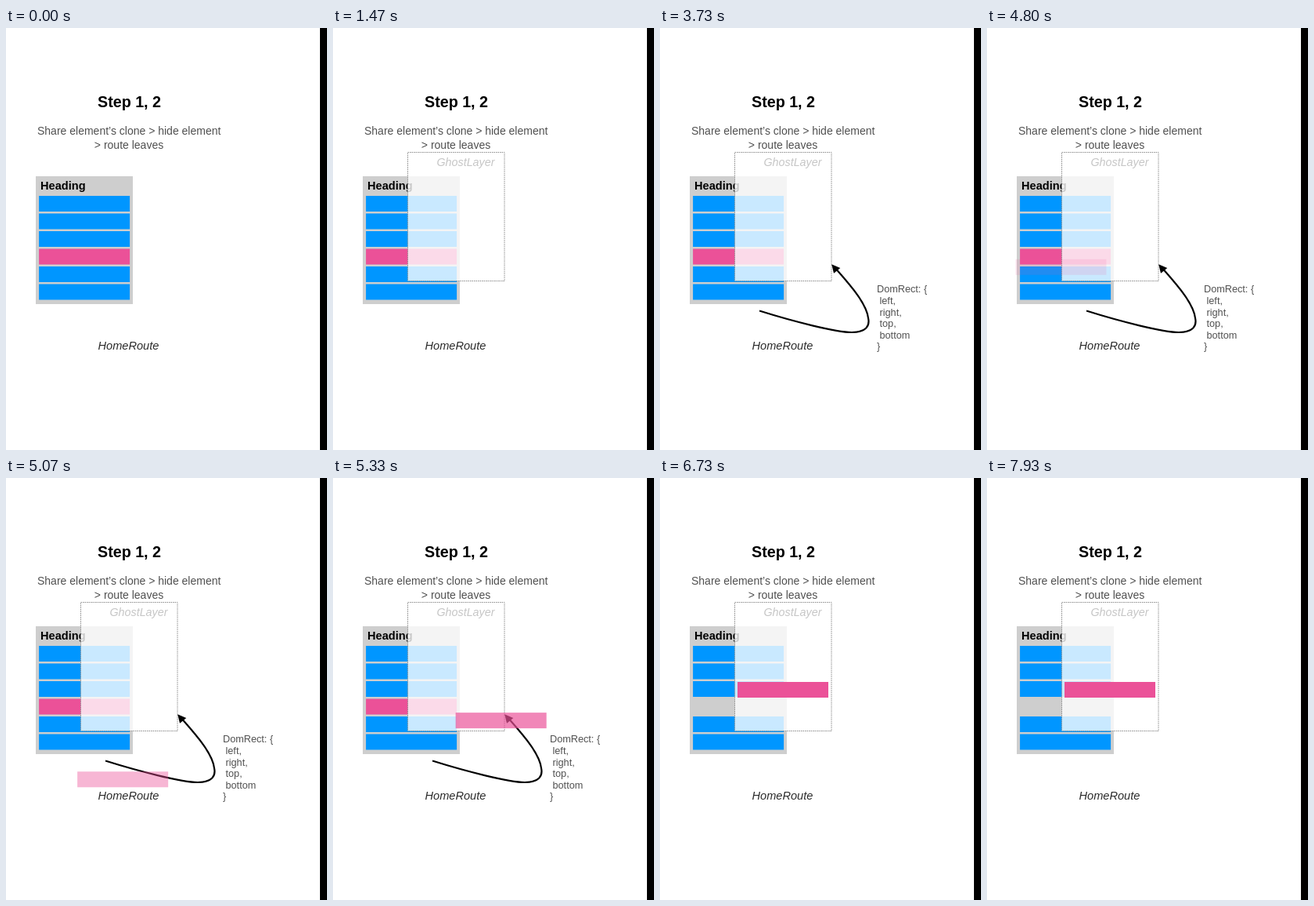
An HTML page for the animation above (8000 ms loop, 410 by 538 pixels).

```html
<!DOCTYPE html>
<html lang="en">
<head>
<meta charset="utf-8">
<title>Shared element transition</title>
<style>
  html, body { margin: 0; width: 100%; height: 100%; overflow: hidden; background: #fff; }
  svg { display: block; width: 410px; height: 538px; }
  text { font-family: "Liberation Sans", Arial, sans-serif; white-space: pre; }
  .bold { font-weight: bold; fill: #000; }
  .light { fill: #505050; }
  .italic { font-style: italic; }
  .center { text-anchor: middle; }
</style>
</head>
<body>
<svg viewBox="0 0 410 538">
  <rect width="410" height="538" fill="#fff"/>
  <rect x="401" width="9" height="538" fill="#000"/>

  <text class="bold center" x="157.5" y="101.3" font-size="19.7">Step 1, 2</text>
  <g class="light center" font-size="14">
    <text x="157.2" y="135.6">Share element’s clone &gt; hide element</text>
    <text x="157" y="153.5">&gt; route leaves</text>
  </g>

  <rect x="38" y="189" width="124" height="163" fill="#cecece"/>
  <text class="bold" x="44" y="206.2" font-size="14.6">Heading</text>
  <g id="rows"></g>
  <text class="italic" x="117.5" y="410" font-size="14.6" fill="#2c2c2c">HomeRoute</text>

  <g id="ghost">
    <rect x="95.5" y="158.5" width="123.5" height="164" fill="#fff" fill-opacity=".79"
          stroke="#8c8c8c" stroke-width="1" stroke-dasharray="1.5 1"/>
    <text class="italic" x="132.5" y="176" font-size="14.3" fill="#c6c6c6">GhostLayer</text>
  </g>

  <g id="domRect" class="light" font-size="12.7"></g>

  <g id="arrow">
    <path d="M127 360.5C170 374 225 388 245 388C264 388 268 379 266 370C264 352 245 330 226 308.5"
          fill="none" stroke="#000" stroke-width="2.2"/>
    <path d="M219.2 301.2L230.3 305.9L222 312.8Z"/>
  </g>

  <path id="route" fill="none"
        d="M100 291.5C90 310 88 330 106 350C126 372 148 389 170 389C200 389 219.5 365 219.5 338C219.5 306 211 290 157 270"/>
  <rect id="clone" x="-58" y="-10" width="116" height="20" fill="#eb5198"/>
</svg>
<script>
const LOOP = 8000;
const GHOST_IN = 1470, DOM_IN = 2530, ARROW_IN = 3600;
const MOVE = [4670, 5632], NOTES_OUT = [5780, 6130], ROW_OUT = [6120, 6540];
const SHARED_ROW = 3;

const $ = id => document.getElementById(id);
const add = (parent, tag, attrs, text = "") => {
  const node = document.createElementNS("http://www.w3.org/2000/svg", tag);
  for (const key in attrs) node.setAttribute(key, attrs[key]);
  node.textContent = text;
  return parent.appendChild(node);
};
const progress = (t, [from, to]) => Math.min(1, Math.max(0, (t - from) / (to - from)));
const easeInOut = p => (1 - Math.cos(Math.PI * p)) / 2;
const rowPlace = i => `translate(100.1 ${224 + 22.5 * i})`;

const rows = Array.from({ length: 6 }, (_, i) => add($("rows"), "rect", {
  x: -58, y: -10, width: 116, height: 20,
  transform: rowPlace(i),
  fill: i === SHARED_ROW ? "#eb5198" : "#0096ff"
}));

["DomRect: {", "left,", "right,", "top,", "bottom", "}"].forEach((line, i) =>
  add($("domRect"), "text", { x: i % 5 ? 280.5 : 277, y: 337.3 + 14.6 * i }, line));

const route = $("route"), routeLength = route.getTotalLength();
const setOpacity = (id, value) => $(id).setAttribute("opacity", value);

function render(t) {
  const notes = 1 - easeInOut(progress(t, NOTES_OUT));
  setOpacity("ghost", t >= GHOST_IN ? 1 : 0);
  setOpacity("domRect", t >= DOM_IN ? notes : 0);
  setOpacity("arrow", t >= ARROW_IN ? notes : 0);

  const move = progress(t, MOVE);
  const point = route.getPointAtLength(routeLength * easeInOut(move));
  $("clone").setAttribute("transform", `translate(${point.x} ${point.y})`);
  setOpacity("clone", move);

  const scale = 1 - progress(t, ROW_OUT) ** 2;
  rows[SHARED_ROW].setAttribute("transform", `${rowPlace(SHARED_ROW)} scale(${scale})`);
}

const start = performance.now();
function tick() {
  render((performance.now() - start) % LOOP);
  requestAnimationFrame(tick);
}
tick();
</script>
</body>
</html>
```
